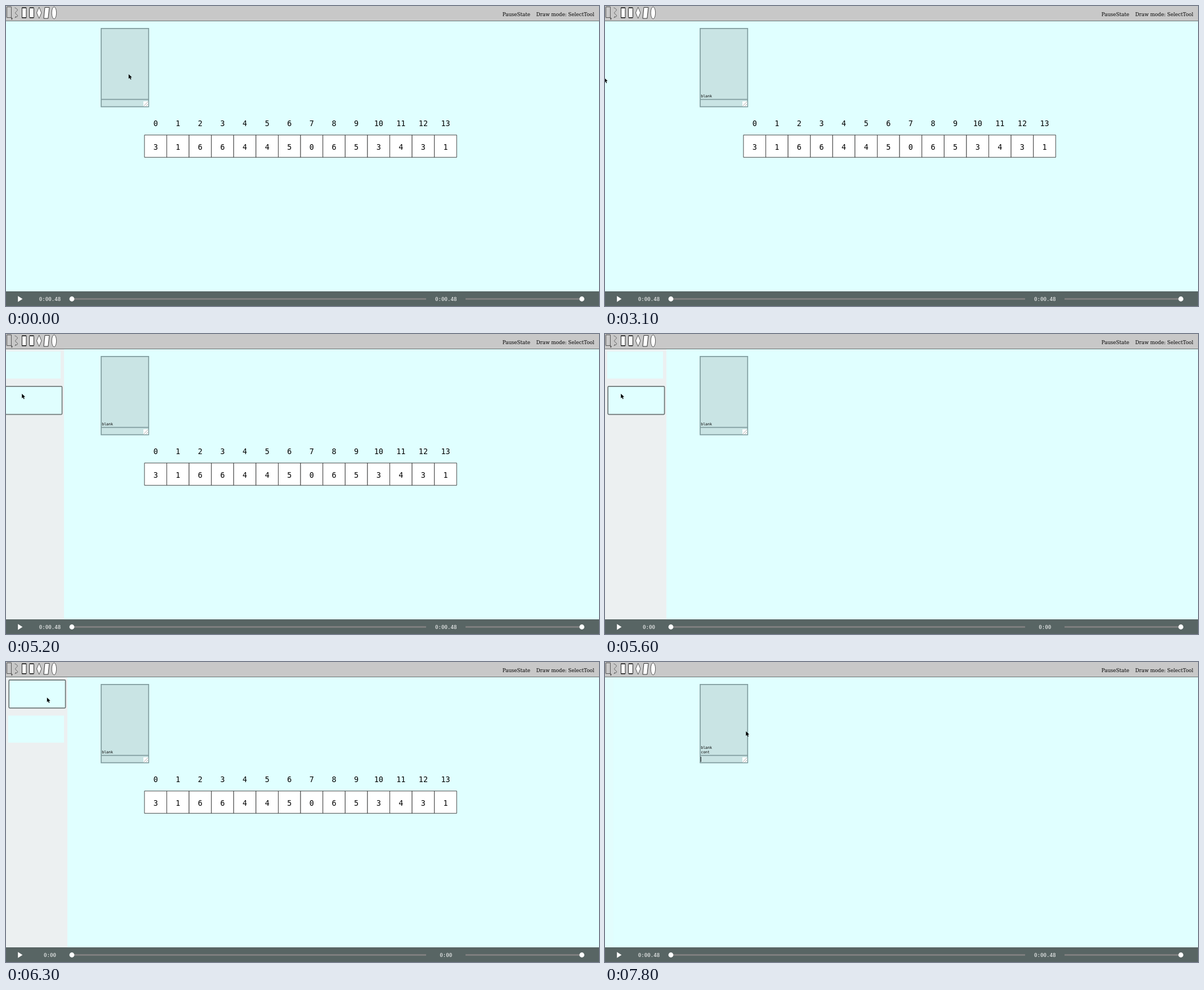
These frames come from a looping animation (1053x532 px, 8 s). An HTML page with a canvas:

```html
<!DOCTYPE html>
<html lang="en">
<head>
<meta charset="utf-8">
<title>Array drawing tool</title>
<style>
html, body { margin: 0; width: 100%; height: 100%; overflow: hidden; background: #e0ffff; }
canvas { display: block; }
</style>
</head>
<body>
<canvas id="stage" width="1053" height="532"></canvas>
<script>
const ctx = document.getElementById('stage').getContext('2d');
const LOOP = 8000;
const MONO = '"DejaVu Sans Mono", monospace';
const SERIF = '"DejaVu Serif", serif';
const BG = '#e0ffff';
const VALUES = [...'31664450653431'];

// Places where the pointer rests: time, x, y.
const STOPS = [
  [3100, -1.2, 127.3], [3800, 14.8, 106.8], [4200, 17, 106.8], [4500, 3.6, 105.9],
  [5200, 28.2, 105.9], [5600, 28.2, 105.9], [6300, 72.8, 63.1], [7000, 250.3, 122.9]
];

const clamp = u => Math.min(1, Math.max(0, u));
const easeOut = (u, power) => 1 - (1 - clamp(u)) ** power;
const within = (t, from, to) => t >= from && t < to;

// Motion is seen only on a 360 ms beat, snapped to whole 100 ms.
function lastBeat(t) {
  const beat = n => 3100 + 100 * Math.floor((18 * n + 1) / 5);
  if (t < beat(0)) return t;
  let n = 0;
  while (beat(n + 1) <= t) n++;
  return beat(n);
}

function pointer(t) {
  if (t < STOPS[0][0]) return [217.8, 120.9];
  const i = STOPS.findLastIndex(stop => stop[0] <= t);
  const [t0, x0, y0] = STOPS[i];
  const [t1, x1, y1] = STOPS[i + 1] || [LOOP, x0, y0];
  const u = easeOut((t - t0) / (t1 - t0), 3);
  return [x0 + (x1 - x0) * u, y0 + (y1 - y0) * u];
}

function typed(t) {
  if (t < 1700) return 'blank'.slice(0, Math.max(0, Math.floor(t / 100) - 9));
  return within(t, 7400, 7800) ? 'cont' : '';
}

function rect(x, y, w, h, fill) {
  ctx.fillStyle = fill;
  ctx.fillRect(x, y, w, h);
}

function outline(color, width = 0.9) {
  ctx.strokeStyle = color;
  ctx.lineWidth = width;
  ctx.stroke();
}

function box(x, y, w, h, fill, edge, width, radius = 0) {
  ctx.beginPath();
  ctx.roundRect(x, y, w, h, radius);
  ctx.fillStyle = fill;
  ctx.fill();
  outline(edge, width);
}

function line(x0, y0, x1, y1, color, width) {
  ctx.beginPath();
  ctx.moveTo(x0, y0);
  ctx.lineTo(x1, y1);
  outline(color, width);
}

function poly(points, fill, edge) {
  ctx.beginPath();
  points.forEach(([x, y]) => ctx.lineTo(x, y));
  ctx.closePath();
  ctx.fillStyle = fill;
  ctx.fill();
  if (edge) outline(edge);
}

function ellipse(x, y, rx, ry, fill, edge) {
  ctx.beginPath();
  ctx.ellipse(x, y, rx, ry, 0, 0, Math.PI * 2);
  ctx.fillStyle = fill;
  ctx.fill();
  if (edge) outline(edge);
}

function text(str, x, y, size, family, align = 'left', color = '#000') {
  ctx.font = size + 'px ' + family;
  ctx.textAlign = align;
  ctx.fillStyle = color;
  ctx.fillText(str, x, y);
}

function drawSidebar(shown, hover) {
  if (!shown) return;
  ctx.save();
  ctx.globalAlpha = shown;
  ctx.translate(-109 * (1 - shown), 0);
  rect(0, 27, 109, 479, '#ecf0f1');
  let y = 31;
  for (let i = 0; i < 2; i++) {
    if (i === hover) box(5.2, y + 0.9, 100.4, 49.7, BG, '#6b7474', 1.7, 1.5);
    else rect(4, y, 99, 48, BG);
    y += i === hover ? 64 : 61;
  }
  ctx.restore();
}

function drawToolbar() {
  rect(0, 0, 1053, 26, '#c8c8c8');
  rect(0, 26, 1053, 1, '#6a7272');

  box(1.5, 1.5, 8, 19, '#c8c8c8', '#555', 1);
  poly([[8.5, 19.5], [12, 22], [10, 25]], '#555');

  ctx.beginPath();
  ctx.moveTo(15.5, 3);
  ctx.bezierCurveTo(27, 8, 14, 10, 17, 13.5);
  ctx.bezierCurveTo(20, 16, 24, 18, 16, 20.5);
  ctx.lineTo(18, 18);
  outline('#555');

  box(28.5, 3.2, 7.5, 17.5, '#fff', '#222', 1);
  box(41.5, 3.2, 8, 17.5, '#fff', '#222', 1, 1.5);
  for (const x of [28.2, 41.8]) {
    line(x, 3.2, x + 7.7, 3.2, '#111', 1.4);
    line(x, 20.7, x + 7.7, 20.7, '#111', 1.4);
  }
  poly([[58.7, 2], [63, 12], [58.7, 22], [54.5, 12]], '#fff', '#444');
  poly([[69, 2.5], [77, 2.5], [74.8, 22], [67, 22]], '#fff', '#222');
  ellipse(85.4, 12.2, 4.2, 10.6, '#fff', '#444');

  text('PauseState', 931, 17.6, 8.78, SERIF, 'right');
  text('Draw mode: SelectTool', 1044.5, 17.6, 8.78, SERIF, 'right');
}

function drawConsole(log, input, caret) {
  const edge = '#809c9e';
  box(169, 39.8, 84.3, 138.8, '#c9e4e4', edge, 1.7);
  line(169, 165.7, 253, 165.7, edge, 1.7);

  rect(244, 169, 8.4, 8.8, '#fff');
  line(244.6, 177.4, 252, 169.8, '#999', 0.8);
  line(248.6, 177.4, 252, 174, '#999', 0.8);

  log.forEach((s, i) => text(s, 170.2, 162.4 - 8.7 * (log.length - 1 - i), 6.58, MONO));
  text(input, 169.6, 175, 6.58, MONO);
  if (caret) rect(169.8 + input.length * 3.92, 168, 0.9, 9, '#000');
}

function drawArray() {
  const cell = 39.6;
  VALUES.forEach((v, i) => {
    const x = 245.9 + i * cell, mid = x + cell / 2;
    box(x, 228.8, cell, 39.5, '#fff', '#333');
    text(i, mid, 213, 13.4, MONO, 'center');
    text(v, mid, 255, 13.4, MONO, 'center');
  });
}

function drawSlider(from, to, knob) {
  rect(from, 518.1, to - from, 2.8, '#808080');
  ellipse(knob, 519.5, 4.4, 4.4, '#fff');
}

function drawPlayer(clock) {
  rect(0, 506, 1053, 26, '#586564');
  poly([[21.2, 514.2], [29.4, 519.5], [21.2, 524.8]], '#fff');
  for (const x of [78, 781.2]) text(clock, x, 522.8, 9.15, MONO, 'center', '#fff');
  drawSlider(113, 746, 117);
  drawSlider(816, 1026, 1022.6);
}

function drawPointer([x, y]) {
  ctx.save();
  ctx.translate(x, y);
  poly([[0, 0], [0, 8], [1.9, 6.4], [3.3, 9.5], [4.6, 8.9], [3.3, 5.9], [5.8, 5.7]], '#000');
  ctx.restore();
}

function render(t) {
  const now = lastBeat(t);
  const shown = easeOut((now - 4500) / 1000, 2.4) - easeOut((now - 7290) / 900, 2.4);
  const hover = within(t, 4900, 5900) ? 1 : within(t, 5900, 6600) ? 0 : -1;
  const caret = within(t, 500, 3100) || within(t, 3400, 4900) || t >= 7000;
  const log = ['blank', 'cont'].slice(0, (t >= 1800) + (t >= 7800));

  rect(0, 0, 1053, 532, BG);
  drawSidebar(shown, hover);
  drawToolbar();
  drawConsole(log, typed(t), caret);
  if (t < 5600 || within(t, 6300, 7800)) drawArray();
  drawPlayer(within(t, 5600, 6600) ? '0:00' : '0:00.48');
  drawPointer(pointer(now));
}

function tick() {
  render(performance.now() % LOOP);
  requestAnimationFrame(tick);
}
tick();
</script>
</body>
</html>
```
